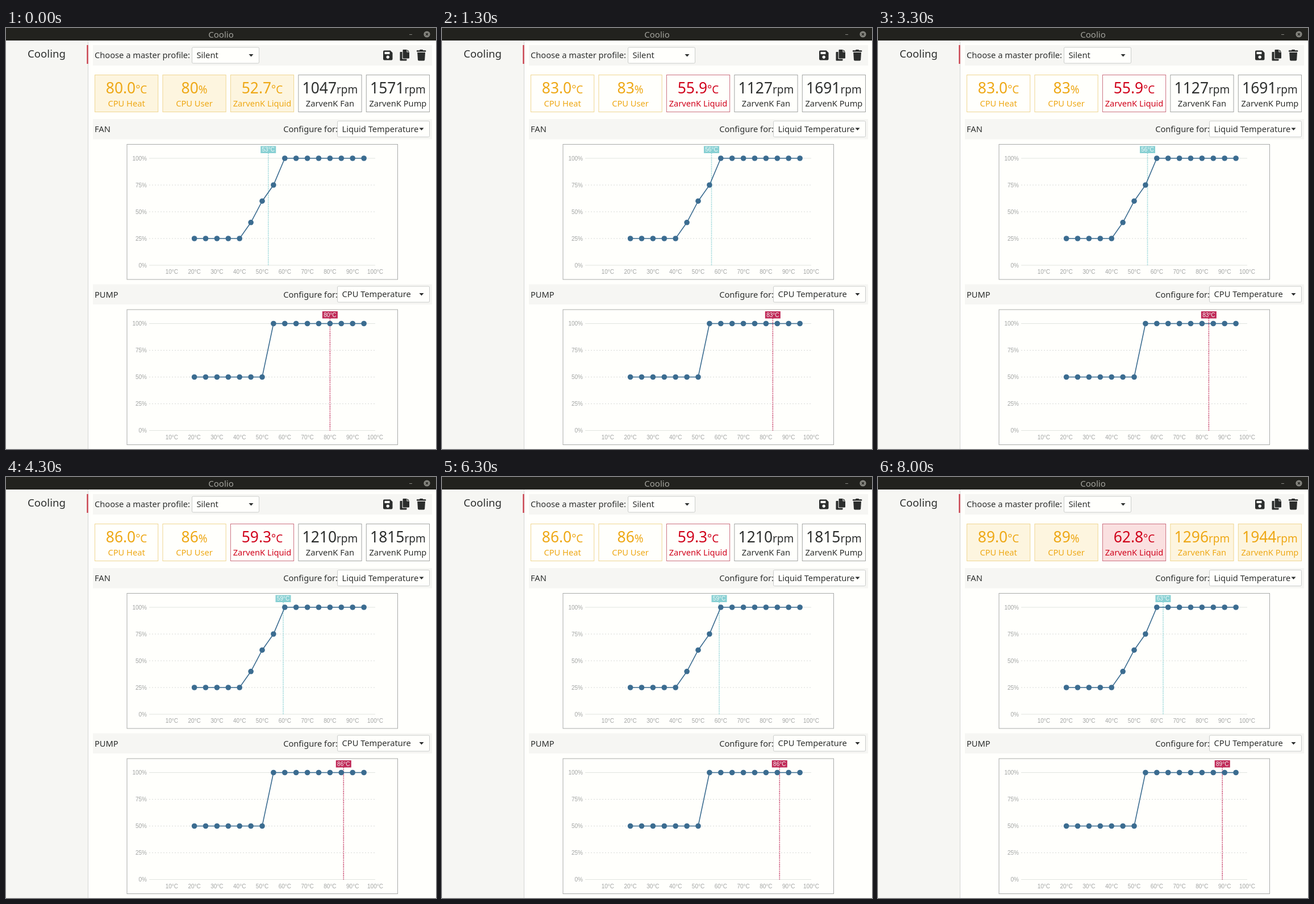
An HTML page for the animation above (8100 ms loop, 757 by 740 pixels).

```html
<!DOCTYPE html>
<html lang="en">
<head>
<meta charset="utf-8">
<title>Coolio</title>
<style>
html, body { margin: 0; width: 100%; height: 100%; overflow: hidden; background: #fffffc; }
svg { display: block; width: 757px; height: 740px; }
text { font: 14.67px "Noto Sans", sans-serif; fill: #2d2f2e; white-space: pre; }
.mid { text-anchor: middle; }
.end { text-anchor: end; }
.axis { font: 10px "Liberation Sans", Arial, sans-serif; fill: #a2a4a3; }
.tag { font: 10px "Liberation Sans", Arial, sans-serif; fill: #f4fbfa; }
.value { font-size: 26.4px; font-weight: 500; }
.unit { font-size: 19px; }
</style>
</head>
<body>
<svg viewBox="0 0 757 740">
  <g id="base"></g>
  <g id="live"></g>
  <g id="curves"></g>
</svg>
<script>
const LOOP = 8100;
const STATES = [
  { from: 0, cpu: 80, liquid: 52.7, fan: 1047, pump: 1571 },
  { from: 1300, cpu: 83, liquid: 55.9, fan: 1127, pump: 1691 },
  { from: 4300, cpu: 86, liquid: 59.3, fan: 1210, pump: 1815 },
  { from: 7300, cpu: 89, liquid: 62.8, fan: 1296, pump: 1944 }
];
const LEVELS = {
  ok: { text: '#2d2f2e', border: '#a3a5a4', glow: 0 },
  warn: { text: '#eea816', border: '#efd692', glow: 1 },
  crit: { text: '#d0021b', border: '#cb7080', glow: 1 }
};
const FAN_TOP = 229, PUMP_TOP = 519.5, HEIGHT = 188;

const $ = id => document.getElementById(id);
const range = (n, f) => Array.from({ length: n }, (_, i) => f(i)).join('');
const rect = (x, y, w, h, fill, more = '') =>
  `<rect x="${x}" y="${y}" width="${w}" height="${h}" fill="${fill}" ${more}/>`;
const text = (x, y, s, cls = '', more = '') => `<text x="${x}" y="${y}" class="${cls}" ${more}>${s}</text>`;
const line = (x1, y1, x2, y2, stroke, more = '') =>
  `<line x1="${x1}" y1="${y1}" x2="${x2}" y2="${y2}" stroke="${stroke}" ${more}/>`;
const path = (d, fill, more = '') => `<path d="${d}" fill="${fill}" ${more}/>`;

const chartX = temp => 252 + 3.98 * temp;
const chartY = (top, duty) => top + HEIGHT * (1 - duty / 100);

function select(x, y, w, label) {
  return rect(x + .5, y + .5, w, 28, '#fffffc', 'stroke="#cbcdcb" rx="2"') +
    text(x + 8.5, y + 19.5, label) +
    path(`M${x + w - 17.5} ${y + 12.5}h8l-4 4.5z`, '#2d2f2e');
}

function section(y, name, source) {
  return rect(153, y, 597, 35.5, '#f6f6f3') + text(156, y + 23, name) +
    text(584, y + 23, 'Configure for:', 'end') + select(583, y + 3, 162, source);
}

function grid(top) {
  return rect(213, top - 24.5, 476.5, 237.5, '#fffffc', 'stroke="#a9abaa"') +
    range(5, i => {
      const y = chartY(top, i * 25);
      const dash = i % 4 ? 'stroke-dasharray="2 3"' : '';
      return line(252, y, 650, y, i % 4 ? '#d8dad7' : '#e1e4e0', dash) +
        text(248, y + 3.7, i * 25 + '%', 'axis end');
    }) +
    range(10, i => text(chartX(10 * i + 10), top + 203, 10 * i + 10 + '°C', 'axis mid'));
}

function curve(top, duty) {
  const points = Array.from({ length: 16 }, (_, i) => [chartX(20 + 5 * i), chartY(top, duty(20 + 5 * i))]);
  return `<polyline points="${points.join(' ')}" fill="none" stroke="#3b6c90" stroke-width="1.6"/>` +
    points.map(([x, y]) => `<circle cx="${x}" cy="${y}" r="4.8" fill="#3b6c90"/>`).join('');
}

function marker(top, temp, color) {
  const x = chartX(temp);
  return line(x, top - 9, x, top + HEIGHT, color, 'stroke-width="1.6" stroke-dasharray="1.6 1.6"') +
    rect(x - 13.5, top - 21.5, 27, 12.5, color) +
    text(x, top - 11.6, Math.round(temp) + '°C', 'tag mid');
}

function card(i, value, unit, label, level, pulse) {
  const { text: color, border, glow } = LEVELS[level];
  const x = 156.5 + 119.45 * i, mid = x + 55.6;
  const fill = `style="fill:${color}"`;
  return rect(x, 82.5, 111.2, 65, color, `fill-opacity="${glow * pulse}" stroke="${border}"`) +
    text(mid, 115, `<tspan class="value">${value}</tspan><tspan class="unit">${unit}</tspan>`, 'mid', fill) +
    text(mid, 138, label, 'mid', fill);
}

const ink = '#2b2d2c', bar = '#f6f6f3';
$('base').innerHTML =
  rect(0, 0, 757, 740, '#fffffc') +
  rect(0, 22, 144, 718, bar) + line(144.5, 22, 144.5, 740, '#d3d5d3') +
  rect(142.3, 30, 2.4, 33, '#cc4450') +
  text(71.5, 52, 'Cooling', 'mid', 'style="font-size:18.6px"') +
  rect(0, 0, 757, 22, '#22221e') +
  text(378.5, 16.5, 'Coolio', 'mid', 'style="font-size:15px;fill:#a3a39d"') +
  line(710, 11.5, 715, 11.5, '#85857f') +
  '<circle cx="741" cy="11" r="5.6" fill="#85857f"/>' +
  path('M739 9l4 4m0-4l-4 4', 'none', 'stroke="#22221e" stroke-width="1.3"') +
  rect(153, 30, 597, 36, bar) +
  text(156, 53, 'Choose a master profile:') + select(327, 33.5, 118, 'Silent') +
  // save, copy, delete
  path('M666 39.5h10.5l4 4v11a2 2 0 0 1-2 2H666a2 2 0 0 1-2-2v-13a2 2 0 0 1 2-2zM666.5 42v4h9v-4zM672.2 48.4a2.8 2.8 0 1 0 .01 0z',
    ink, 'fill-rule="evenodd"') +
  path('M694.5 42h3v11.5a1 1 0 0 0 1 1h7v2a1 1 0 0 1-1 1h-10a1 1 0 0 1-1-1V43a1 1 0 0 1 1-1z', ink) +
  path('M699.5 38h6v4.5h4.5v10a1 1 0 0 1-1 1h-9.5a1 1 0 0 1-1-1V39a1 1 0 0 1 1-1zM706.5 38l3.5 3.5h-3.5z', ink) +
  path('M723 39.3h4.8l1-1.3h4.6l1 1.3h4.8v2.4H723zM724.2 43h13.8l-.8 12.8a1.8 1.8 0 0 1-1.8 1.7h-8.6a1.8 1.8 0 0 1-1.8-1.7z', ink) +
  section(160, 'FAN', 'Liquid Temperature') + grid(FAN_TOP) +
  section(450.5, 'PUMP', 'CPU Temperature') + grid(PUMP_TOP);

const fanSteps = { 45: 40, 50: 60, 55: 75 };
$('curves').innerHTML =
  curve(FAN_TOP, t => t <= 40 ? 25 : fanSteps[t] || 100) +
  curve(PUMP_TOP, t => t <= 50 ? 50 : 100);

function draw(now) {
  const t = Math.floor(now % LOOP / 100) * 100;
  const { cpu, liquid, fan, pump } = STATES.filter(s => s.from <= t).pop();
  const pulse = .185 * Math.sin(Math.PI * (t - 300) / 1000) ** 2;
  const speed = cpu >= 89 ? 'warn' : 'ok';
  $('live').innerHTML =
    card(0, cpu.toFixed(1), '°C', 'CPU Heat', 'warn', pulse) +
    card(1, cpu, '%', 'CPU User', 'warn', pulse) +
    card(2, liquid.toFixed(1), '°C', 'ZarvenK Liquid', liquid > 55 ? 'crit' : 'warn', pulse) +
    card(3, fan, 'rpm', 'ZarvenK Fan', speed, pulse) +
    card(4, pump, 'rpm', 'ZarvenK Pump', speed, pulse) +
    marker(FAN_TOP, liquid, '#88d0d3') +
    marker(PUMP_TOP, cpu, '#c02a58');
}

const start = performance.now();
function tick() {
  draw(performance.now() - start);
  requestAnimationFrame(tick);
}
tick();
</script>
</body>
</html>
```
